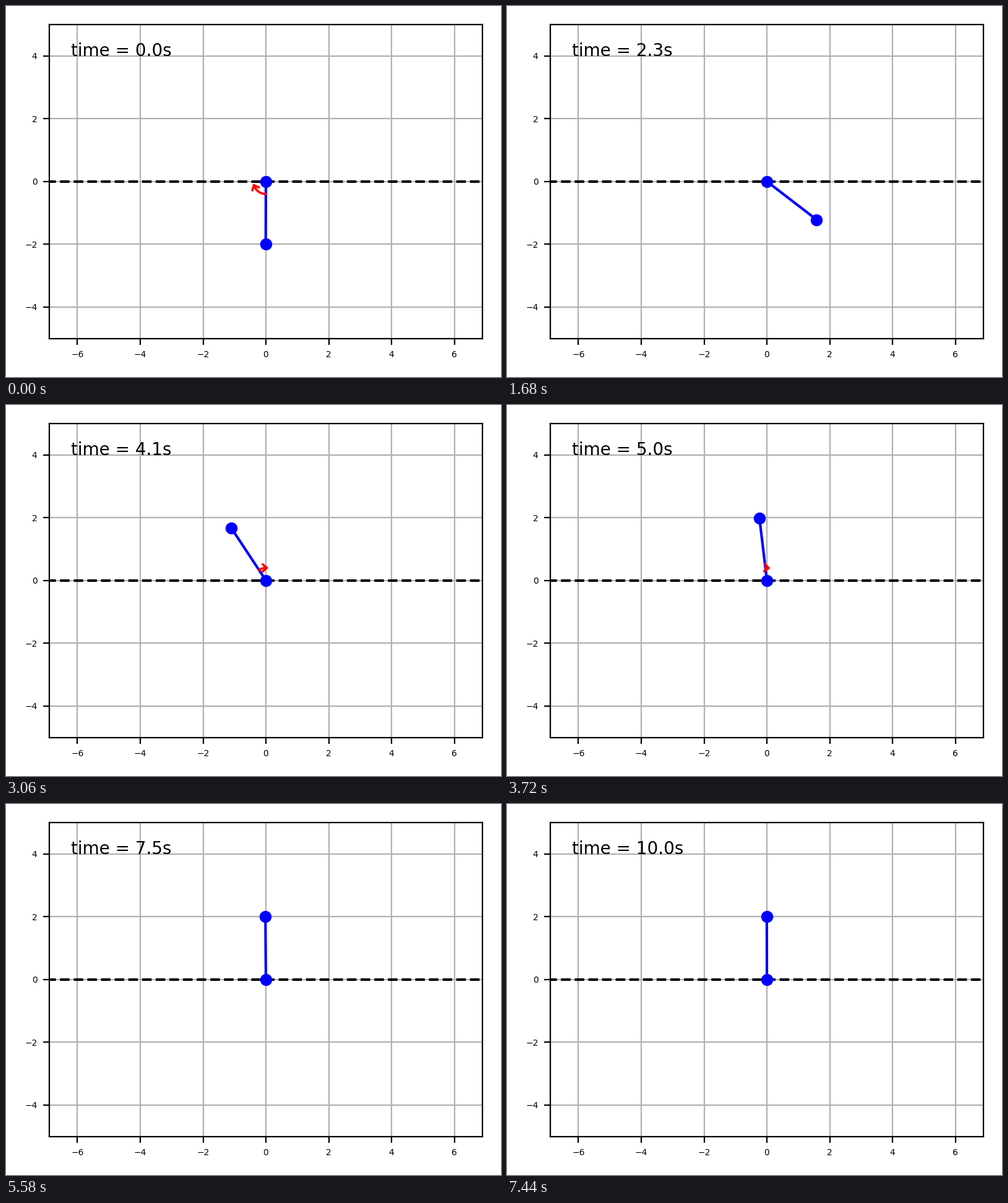
Write a matplotlib script that moves like this. It is 800x600 px and loops after 7470 ms.

```python
import numpy as np
import matplotlib.pyplot as plt
from matplotlib.animation import FuncAnimation

FRAMES, INTERVAL, DT = 249, 30, 0.04
ROD, ARC_R = 2.0, 0.4
HEAD, HEAD_ANGLE = 0.165, np.radians(42)
CATCH = 4.12  # time at which the upright balance takes over

# time, angle from hanging (positive to the right), angular speed
SWING = np.array([
    (0, 0, 0), (0.5, -0.262, -0.82), (0.92, -0.485, 0), (1.16, -0.368, 0.92),
    (1.44, 0, 1.6), (1.78, 0.53, 1.35), (2.28, 0.915, 0), (2.6, 0.72, -1.22),
    (2.975, 0, -2.6), (3.2, -0.62, -2.85), (3.5, -1.45, -2.6),
    (3.8, -2.09, -1.8), (CATCH, -2.559, -1.14)])

# time, torque shown as arc angle, its rate
TORQUE = np.array([
    (0, -1.27, 0.1), (0.72, 0, 2.0), (1.25, 0.93, 0), (2.28, 0, -1.3),
    (3.1, -1.15, 0), (CATCH, -0.65, 0.71)])


def hermite(knots, t):
    i = np.clip(np.searchsorted(knots[:, 0], t) - 1, 0, len(knots) - 2)
    (t0, p0, v0), (t1, p1, v1) = knots[i], knots[i + 1]
    h = t1 - t0
    s = (t - t0) / h
    return (p0 + (p1 - p0) * s * s * (3 - 2 * s)
            + h * s * (1 - s) * (v0 * (1 - s) - v1 * s))


def angle(t):
    if t <= CATCH:
        return hermite(SWING, t)
    tau = t - CATCH
    return -np.pi + 0.503 * np.exp(-2.15 * tau) + 0.08 * np.exp(-0.72 * tau)


def torque(t):
    if t <= CATCH:
        return hermite(TORQUE, t)
    return -0.65 * np.exp(-1.09 * (t - CATCH))


def polar(r, a):
    return r * np.sin(a), -r * np.cos(a)


def arrow_head(tip, arc):
    """Two strokes meeting at the end of the arc."""
    x, y = polar(ARC_R, tip)
    back = tip - 0.1 * arc + (np.pi if arc > 0 else 0)
    sides = back + np.array([-HEAD_ANGLE, HEAD_ANGLE])
    hx, hy = x + HEAD * np.cos(sides), y + HEAD * np.sin(sides)
    return [hx[0], x, hx[1]], [hy[0], y, hy[1]]


plt.rcParams["font.family"] = "DejaVu Sans"
fig = plt.figure(figsize=(4, 3), dpi=200)
ax = fig.add_axes([70 / 800, 62.5 / 600, 700 / 800, 507.5 / 600])
ax.set_xlim(-350 / 50.75, 350 / 50.75)
ax.set_ylim(-5, 5)
ax.set_xticks(range(-6, 7, 2))
ax.set_yticks(range(-4, 5, 2))
ax.tick_params(labelsize=5)
ax.grid(True)

ax.plot([-10, 10], [0, 0], "k--")
rod, = ax.plot([], [], "bo-")
arc_line, = ax.plot([], [], color="red", lw=1.3)
head_line, = ax.plot([], [], color="red", lw=1.3)
clock = ax.text(0.05, 0.9, "", transform=ax.transAxes, fontsize=10)


def update(k):
    t = (k // 2 * 2 + 1) * DT  # the picture changes every second tick
    a, arc = angle(t), torque(t)
    x, y = polar(ROD, a)
    rod.set_data([0, x], [0, y])
    shown = abs(arc) > 0.025
    arc_line.set_data(*polar(ARC_R, np.linspace(a, a + arc, 30)))
    head_line.set_data(*arrow_head(a + arc, arc))
    arc_line.set_visible(shown)
    head_line.set_visible(shown)
    clock.set_text(f"time = {t:.1f}s")
    return rod, arc_line, head_line, clock


anim = FuncAnimation(fig, update, frames=FRAMES, interval=INTERVAL,
                     repeat=True, repeat_delay=0)
plt.show()
```
